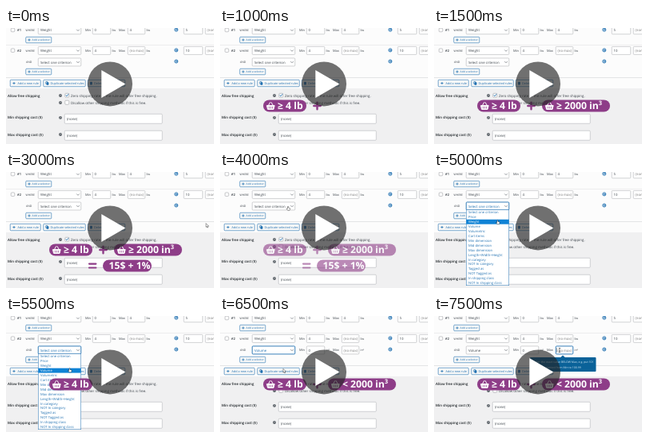
Animation, 260 px wide and 146 px high, one loop 8 s. Source, as an HTML page:

```html
<!DOCTYPE html>
<html lang="en">
<head>
<meta charset="utf-8">
<title>Shipping rules demo</title>
<style>
html, body { margin: 0; width: 100%; height: 100%; overflow: hidden; background: #fff; }
svg { display: block; width: 100%; height: 100%; }
text { font-family: "Open Sans", "Noto Sans", sans-serif; text-rendering: geometricPrecision; white-space: pre; }
</style>
</head>
<body>
<svg id="stage" viewBox="0 0 260 146"></svg>
<script>
const BLUE = '#2271b1', INK = '#3c434a', EDGE = '#a4a7ab', PURPLE = '#8e3d88';
const STEP = 500, STEPS = 16;
const ITEMS = ['Select one criterion', 'Price', 'Weight', 'Volume', 'Volumetric', 'Cart items',
  'Min dimension', 'Mid dimension', 'Max dimension', 'Length+Width+Height', 'In category',
  'NOT In category', 'Tagged as', 'NOT Tagged as', 'In shipping class', 'NOT In shipping class'];

const box = (x, y, w, h, fill = '#fff', stroke = EDGE, r = 1, line = .5) =>
  `<rect x="${x + .25}" y="${y + .25}" width="${w - .5}" height="${h - .5}" rx="${r}" fill="${fill}" stroke="${stroke}" stroke-width="${line}"/>`;
const fillRect = (x, y, w, h, fill, r = 0) =>
  `<rect x="${x}" y="${y}" width="${w}" height="${h}" rx="${r}" fill="${fill}"/>`;
const path = (d, stroke, width = .6, fill = 'none') =>
  `<path d="${d}" fill="${fill}" stroke="${stroke}" stroke-width="${width}" stroke-linecap="round" stroke-linejoin="round"/>`;
// y is the vertical middle of the line
const text = (x, y, s, size = 4.3, fill = INK, weight = 400) =>
  `<text x="${x}" y="${y + size * .36}" font-size="${size}" fill="${fill}" font-weight="${weight}">${s}</text>`;

const control = (x, y, w, focus) => box(x, y, w, 10.5, '#fff', focus ? BLUE : EDGE, 1, focus ? .9 : .5);
function select(y, label, focus) {
  return control(40, y, 54, focus) + text(43, y + 5.3, label, 4.3, focus ? BLUE : INK) +
    path(`M88.5 ${y + 4.6}l1.5 1.5l1.5 -1.5`, '#50575e');
}
function field(x, y, w, value, focus) {
  return control(x, y, w, focus) + text(x + 2.5, y + 5.3, value, 4.3, value[0] === '(' ? '#777' : INK);
}
function range(y, min, max, unit, focus) {
  return text(99, y + 5.3, 'Min', 4) + field(108, y, 23, min) + text(132.5, y + 5.3, unit, 3.6) +
    text(141, y + 5.3, 'Max', 4) + field(152, y, 22, max, focus) + text(175.5, y + 5.3, unit, 3.6);
}
const removeIcon = y => `<circle cx="212.8" cy="${y}" r="2" fill="#fff" stroke="${BLUE}" stroke-width="1"/>` +
  path(`M212 ${y - .8}l1.6 1.6m0 -1.6l-1.6 1.6`, BLUE, .8);
function button(x, y, w, h, label, size, indent) {
  return box(x, y, w, h, '#f6f7f7', BLUE, 1, .6) + text(x + indent, y + h / 2, label, size, BLUE);
}
const plusIcon = (x, y) => path(`M${x - 1.2} ${y}h2.4m-1.2 -1.2v2.4`, BLUE, .8);
const addSelector = y => button(24.5, y, 32.5, 8, 'Add a selector', 3.4, 8) + plusIcon(29, y + 4);

function rule(y, n, min, max, cost) {
  return box(6, y + 2.5, 5, 5, '#fff', '#8c8f94') + text(14, y + 5.2, '#' + n, 4.2, INK, 600) +
    text(24.5, y + 5.3, 'WHERE', 3.4) + select(y, 'Weight') + range(y, min, max, 'lbs') +
    removeIcon(y + 4.7) + field(222, y, 24, cost) + field(249, y, 24, '(none)');
}
const help = y => `<circle cx="68" cy="${y}" r="1.9" fill="#50575e"/>` + text(67.2, y, '?', 3, '#fff', 700);

function page(step) {
  const chosen = step >= 12;
  const setting = (y, label) => text(2, y, label, 4.4, '#1d2327', 600) + help(y);
  const input = y => box(73, y, 122.5, 12.5) + text(76, y + 6.3, '(none)', 4.4);
  return fillRect(0, 0, 260, 146, '#fcfcfc') + fillRect(0, 76, 260, 70, '#f0f0f1') +
    rule(-2.5, 1, '0', '4', '5') + addSelector(11) +
    fillRect(0, 21, 260, .5, '#dcdcde') +
    rule(23.2, 2, '4', '(no max)', '10') +
    text(25, 43, 'AND', 3.5) + select(37.7, chosen ? 'Volume' : ITEMS[0], step >= 9 && step < 14) +
    (chosen ? range(37.7, '0', '(no max)', 'in³', step >= 14) : '') +
    removeIcon(42) + addSelector(51) +
    fillRect(0, 62, 260, .5, '#c9cbce') +
    button(5, 65, 38.5, 9, 'Add a new rule', 3.8, 9.5) + plusIcon(10, 69.5) +
    button(46.5, 65, 53, 9, 'Duplicate selected rules', 3.8, 9) +
    box(49.5, 67.3, 2.8, 3.4, 'none', BLUE, .3, .7) + box(50.6, 68.3, 2.8, 3.4, BLUE, BLUE, .3) +
    button(102, 65, 47, 9, 'Delete selected rules', 3.8, 8) + box(105, 67.8, 2.8, 3.6, BLUE, BLUE, .3) +
    setting(85, 'Allow free shipping') + help(94) +
    box(73.5, 82, 5.5, 5.5, '#fff', '#8c8f94') + path('M74.8 84.7l1.2 1.3l2 -2.8', BLUE, .8) +
    text(81, 85, 'Zero shipping rate of the rule will offer free shipping.', 4.4) +
    box(73.5, 91, 5.5, 5.5, '#fff', '#8c8f94') +
    text(81, 94, 'Disallow other shipping methods if this is free.', 4.4) +
    setting(112.8, 'Min shipping cost ($)') + input(108) +
    setting(134, 'Max shipping cost ($)') + input(129);
}

function dropdown(active) {
  const pitch = 5.92;
  return box(40, 47.5, 54, 95.5, '#fff', BLUE, 0) + ITEMS.map((name, i) => {
    const y = 47.9 + i * pitch, on = i === active;
    return (on ? fillRect(40.3, y, 53.4, pitch, '#0f82d5') : '') +
      text(43, y + pitch / 2, name, 4.2, on ? '#fff' : BLUE);
  }).join('');
}

function tooltip() {
  return fillRect(120, 52, 82.5, 18, '#0a6299', 1) + path('M158 52.2l3 -2.6l3 2.6z', 'none', 0, '#0a6299') +
    text(124, 57.8, 'Enter the exact value BELOW Max, e.g. put 101', 3.5, '#d8eaf5') +
    text(129, 64.3, 'to be counted from Min to 100.99', 3.5, '#d8eaf5');
}

const basket = (x, y) => path(`M${x + 2} ${y - .5}l2.2 -3.8m3.6 3.8l-2.2 -3.8`, '#fff', 1) +
  path(`M${x + .3} ${y - .3}h9.4l-1.2 4.8h-7z`, '#fff', 1, '#fff') +
  path(`M${x + 3} ${y + 1.3}v1.9m2 -1.9v1.9m2 -1.9v1.9`, PURPLE, .7);
function pill(x, y, w, label, icon = true) {
  const h = 15, mid = y + h / 2;
  return fillRect(x, y, w, h, PURPLE, h / 2) + (icon ? basket(x + 4.5, mid) : '') +
    text(x + (icon ? 18 : 7.5), mid, label, 12.2, '#fff', 700);
}
const cube = sign => `${sign} 2000 in<tspan font-size="7.5" dy="-4.8">3</tspan>`;
const plus = y => path(`M117.3 ${y}h8.4m-4.2 -4.2v8.4`, PURPLE, 2.4);

function captions(step) {
  if (step < 10) {
    const alpha = step === 8 ? .6 : step === 9 ? .12 : 1;
    const parts = [pill(54, 90.4, 54, '≥ 4 lb'), plus(98), pill(135, 90.4, 85, cube('≥')),
      path('M104 115.6h8.4m-8.4 4.9h8.4', PURPLE, 2.2), pill(121, 110.6, 61, '15$ + 1%', false)];
    return `<g opacity="${alpha}">${parts.slice(0, step).join('')}</g>`;
  }
  return (step >= 11 ? pill(54, 78.4, 54, '≥ 4 lb') : '') +
    (step >= 13 ? plus(86) + pill(135, 78.4, 85, cube('&lt;')) : '');
}

const arrow = (x, y) => path(`M${x} ${y}v4.4l1 -.9l.8 1.6l.7 -.3l-.7 -1.6h1.3z`, '#111', .4, '#fff');
const hand = (x, y) => path(`M${x + 1} ${y + 2.6}v-2.2q.5 -.6 1 0v1.5l2 .6v1.6l-.6 1.2h-2.2l-1.4 -1.9z`, '#111', .4, '#fff');
const spinner = (x, y) => `<circle cx="${x}" cy="${y}" r="1.9" fill="#fff" stroke="#18a0dc" stroke-width="1.1"/>`;
const beam = (x, y) => path(`M${x - .8} ${y - 2.5}h1.6m-.8 0v5m-.8 0h1.6`, '#222', .5);
const POINTERS = {
  6: arrow(250, 65), 7: arrow(151, 54), 8: hand(83.5, 43), 9: spinner(83.5, 43), 10: hand(78, 60.5),
  11: hand(78, 65.5), 12: arrow(69.3, 60.3), 13: arrow(79, 66.8), 14: beam(157, 43),
  15: beam(157, 43) + path('M153.6 40.6v4.8', '#222', .4)
};

const playButton = '<circle cx="130" cy="70.4" r="28" fill="#222" opacity=".64"/>' +
  '<path d="M119.3 53L149.3 70.5L119.3 88z" fill="#fff"/>';

function scene(step) {
  const active = { 9: 0, 10: 2, 11: 3 }[step];
  return page(step) + (active === undefined ? '' : dropdown(active)) +
    (step >= 14 ? tooltip() : '') + captions(step) + (POINTERS[step] || '') + playButton;
}

const stage = document.getElementById('stage');
const start = performance.now();
let shown = -1;
function frame() {
  const step = Math.floor((performance.now() - start) / STEP) % STEPS;
  if (step !== shown) stage.innerHTML = scene(shown = step);
  requestAnimationFrame(frame);
}
frame();
</script>
</body>
</html>
```
